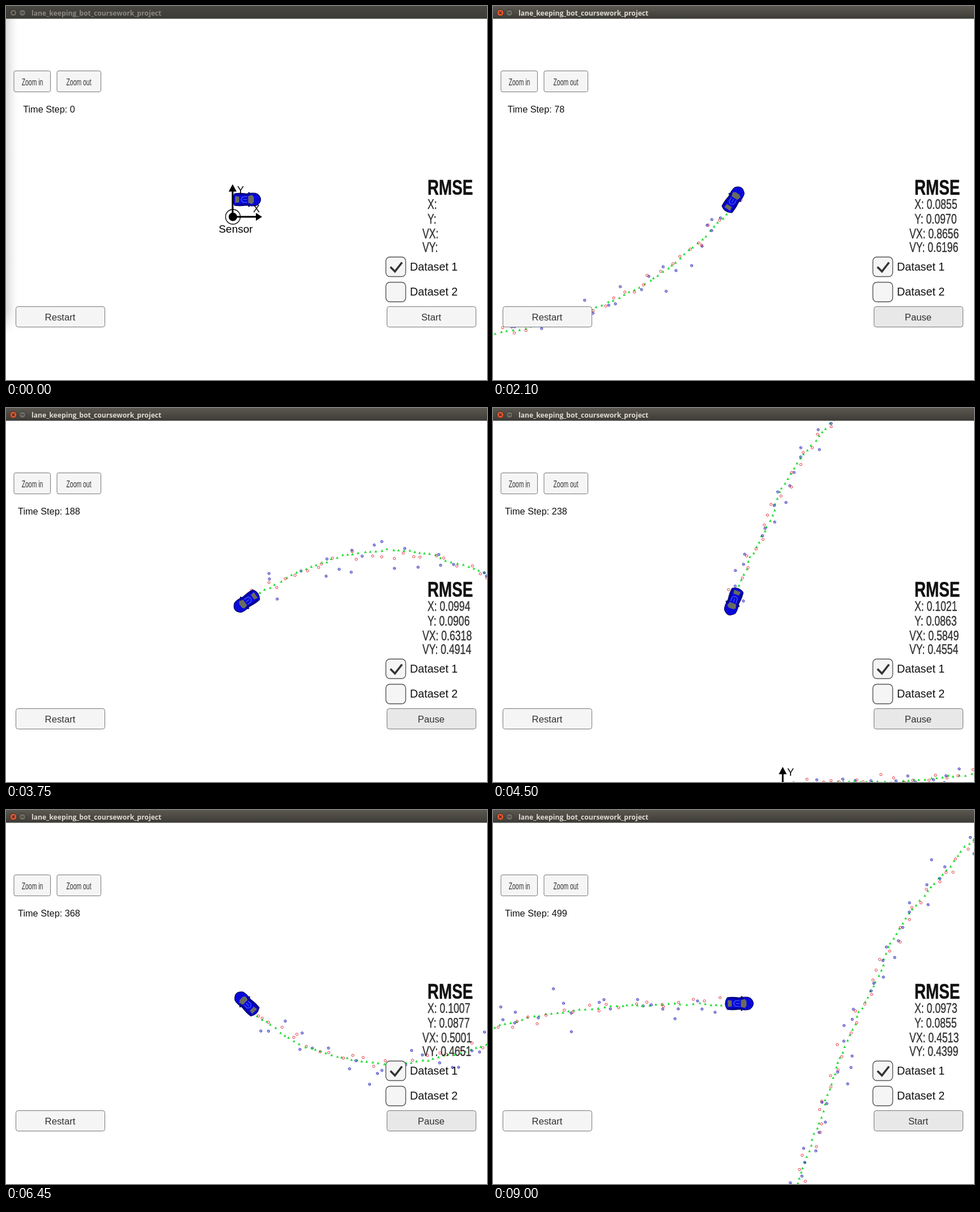
These frames come from a looping animation (849 px wide and 660 px high, 9150 ms). An HTML page with a canvas:

```html
<!DOCTYPE html>
<html lang="en">
<head>
<meta charset="utf-8">
<title>Tracking simulator</title>
<style>
  html, body { margin: 0; width: 849px; height: 660px; overflow: hidden; background: #fff; }
  canvas, svg { position: absolute; left: 0; top: 0; width: 849px; height: 660px; }
  text { font-family: "Liberation Sans", Arial, sans-serif; }
  .box { fill: #f5f5f5; stroke: #777; stroke-width: 1; }
  .check { stroke: #555; stroke-width: 1.4; }
  .label { fill: #323232; font-size: 16.7px; text-anchor: middle; }
  .small { fill: #323232; font-size: 15.6px; text-anchor: middle; }
  .data { fill: #111; font-size: 19.7px; }
  .value { fill: #323232; stroke: #323232; stroke-width: .4; font-size: 23.5px; }
  .caption { font: 700 12.2px "Open Sans", "Noto Sans", sans-serif; }
</style>
</head>
<body>
<canvas id="view" width="849" height="660"></canvas>
<svg viewBox="0 0 849 660">
  <defs>
    <linearGradient id="shade">
      <stop offset="0" stop-color="#dcdcdc"/>
      <stop offset=".4" stop-color="#f1f1f1"/>
      <stop offset="1" stop-color="#fff" stop-opacity="0"/>
    </linearGradient>
    <linearGradient id="fade" x2="0" y2="1">
      <stop offset=".93" stop-color="#fff"/>
      <stop offset="1" stop-color="#000"/>
    </linearGradient>
    <mask id="soft"><rect y="22" width="26" height="556" fill="url(#fade)"/></mask>
    <linearGradient id="bar" x2="0" y2="1">
      <stop offset="0" stop-color="#5b5850"/>
      <stop offset="1" stop-color="#3d3b36"/>
    </linearGradient>
    <linearGradient id="dimBar" x2="0" y2="1">
      <stop offset="0" stop-color="#484640"/>
      <stop offset="1" stop-color="#3c3b37"/>
    </linearGradient>
  </defs>

  <rect id="shadow" y="22" width="26" height="556" fill="url(#shade)" mask="url(#soft)"/>

  <rect id="title" width="849" height="22.5"/>
  <circle id="close" cx="13" cy="12" r="6" stroke="#302e2a"/>
  <path d="M10.8 9.8l4.4 4.4m0-4.4l-4.4 4.4" stroke="#3b2a24" stroke-width="1.4"/>
  <circle cx="29" cy="12" r="6" fill="#6b6961" stroke="#302e2a"/>
  <path d="M26 12h6" stroke="#3b3a36" stroke-width="1.4"/>
  <text id="caption" class="caption" x="45" y="16.5">lane_keeping_bot_coursework_project</text>

  <rect class="box" x="14" y="114.5" width="64.5" height="37" rx="3"/>
  <rect class="box" x="90" y="114.5" width="77.5" height="37" rx="3"/>
  <text class="small" transform="translate(46.5 139.5) scale(.67 1)">Zoom in</text>
  <text class="small" transform="translate(128.5 139.5) scale(.67 1)">Zoom out</text>
  <text id="step" x="76" y="188" font-size="16.3" text-anchor="middle" fill="#111"></text>

  <rect class="box" x="17.5" y="530.5" width="157" height="36" rx="4"/>
  <text class="label" x="95.5" y="554.5">Restart</text>
  <rect id="button" class="box" x="672.5" y="530.5" width="157" height="36" rx="4"/>
  <text id="action" class="label" x="750.5" y="554.5"></text>

  <text transform="translate(744 333) scale(.74 1)" font-size="37.5" font-weight="700" fill="#111" stroke="#111" stroke-width=".5">RMSE</text>
  <g id="errors"></g>

  <rect class="box check" x="670.5" y="443" width="35" height="34.5" rx="7"/>
  <rect class="box check" x="670.5" y="487.5" width="35" height="34.5" rx="7"/>
  <path d="M678.5 460.5l8 8 12.5-16" fill="none" stroke="#333" stroke-width="3.6"/>
  <text class="data" x="713" y="467">Dataset 1</text>
  <text class="data" x="713" y="511">Dataset 2</text>
</svg>

<script>
const LOOP = 9150, TICK = 150, SCALE = 40, DT = 0.05, LAST = 499;
const CENTER = { x: 424, y: 342 };
const $ = id => document.getElementById(id);
const ctx = $("view").getContext("2d");

// Seeded gaussian noise
let seed = 20417;
function random() {
  seed = (seed * 1664525 + 1013904223) % 4294967296;
  return seed / 4294967296;
}
const gauss = () => Math.sqrt(-2 * Math.log(1 - random())) * Math.cos(2 * Math.PI * random());

// The car drives with a sinusoidal turn rate and a gently varying speed.
const path = [];
for (let k = 0, x = 0.6, y = 0.6, yaw = 0; k <= LAST; k++) {
  const phase = 2 * Math.PI * (k + 1) / 500;
  const rate = 0.55 * Math.sin(phase), turn = rate * DT;
  const move = (5 + 0.2 * Math.cos(2 * phase)) * DT;
  path.push({ x, y, yaw, rate });
  x += move * Math.cos(yaw + turn / 2);
  y += move * Math.sin(yaw + turn / 2);
  yaw += turn;
}

// Lidar and radar take turns; the estimate drifts and runs a little wide in bends.
let driftX = 0, driftY = 0;
const trail = path.map((p, k) => {
  driftX = 0.7 * driftX + 0.03 * gauss();
  driftY = 0.7 * driftY + 0.03 * gauss();
  const wide = 0.15 * p.rate;
  const radar = k % 2 === 1;
  let mx = p.x + 0.13 * gauss(), my = p.y + 0.13 * gauss();
  if (radar) {
    const range = Math.hypot(p.x, p.y) + 0.2 * gauss();
    const angle = Math.atan2(p.y, p.x) + 0.024 * gauss();
    mx = range * Math.cos(angle);
    my = range * Math.sin(angle);
  }
  return {
    x: p.x + driftX + wide * Math.sin(p.yaw),
    y: p.y + driftY - wide * Math.cos(p.yaw),
    mx, my, radar
  };
});

// Step, then the error of X, Y, VX and VY
const errors = [
  [8, 0.07, 0.09, 2.2, 1.3],
  [78, 0.0855, 0.0970, 0.8656, 0.6196],
  [128, 0.0931, 0.0996, 0.7257, 0.5636],
  [238, 0.1021, 0.0863, 0.5849, 0.4554],
  [368, 0.1007, 0.0877, 0.5001, 0.4651],
  [448, 0.0975, 0.0861, 0.4703, 0.4478],
  [499, 0.0973, 0.0855, 0.4513, 0.4399]
];
function errorAt(k, col) {
  let i = 0;
  while (i < errors.length - 2 && errors[i + 1][0] < k) i++;
  const a = errors[i], b = errors[i + 1];
  const sum = row => row[col] ** 2 * row[0];
  const f = (k - a[0]) / (b[0] - a[0]);
  return Math.sqrt((sum(a) + (sum(b) - sum(a)) * f) / k).toFixed(4);
}

const rows = [["X:", 744, 358], ["Y:", 744, 383.5], ["VX:", 735, 410], ["VY:", 735, 434]].map(([name, x, y]) => {
  const el = document.createElementNS("http://www.w3.org/2000/svg", "text");
  el.setAttribute("class", "value");
  el.setAttribute("transform", `translate(${x} ${y}) scale(.75 1)`);
  $("errors").append(el);
  return { name, el };
});

function shape(points, color) {
  ctx.beginPath();
  points.forEach(([x, y]) => ctx.lineTo(x, y));
  ctx.closePath();
  ctx.fillStyle = color;
  ctx.fill();
}

function ring(x, y, r, color, width) {
  ctx.beginPath();
  ctx.arc(x, y, r, 0, 7);
  ctx.strokeStyle = color;
  ctx.lineWidth = width;
  ctx.stroke();
}

function line(x1, y1, x2, y2) {
  ctx.beginPath();
  ctx.moveTo(x1, y1);
  ctx.lineTo(x2, y2);
  ctx.stroke();
}

function drawTrail(k, cam) {
  const sx = x => CENTER.x + (x - cam.x) * SCALE;
  const sy = y => CENTER.y - (y - cam.y) * SCALE;
  for (const p of trail.slice(0, k + 1)) {
    const x = sx(p.x), y = sy(p.y), mx = sx(p.mx), my = sy(p.my);
    shape([[x - 2.4, y + 2], [x, y - 2.4], [x + 2.4, y + 2]], "#22dd33");
    ring(mx, my, 2.1, p.radar ? "#1414b4" : "#e0202c", 0.9);
    if (p.radar) line(mx - 1.3, my - 0.8, mx + 1.3, my + 0.8);
  }
}

function drawSensor(cam) {
  ctx.save();
  ctx.translate(CENTER.x - cam.x * SCALE, CENTER.y + cam.y * SCALE + 5.5);
  ring(0.5, 0.5, 13, "#000", 1.3);
  ctx.lineWidth = 3;
  line(0, 0, 0, -47);
  line(0, 0.5, 44, 0.5);
  shape([[-7, -44], [0, -57], [7, -44]], "#000");
  shape([[41, -6.5], [52, 0.5], [41, 7.5]], "#000");
  ctx.beginPath();
  ctx.arc(0.5, 0.5, 7.5, 0, 7);
  ctx.fill();
  ctx.font = '18px "Liberation Sans", Arial, sans-serif';
  ctx.textAlign = "center";
  ctx.fillText("Y", 14, -41);
  ctx.fillText("X", 42, -7.5);
  ctx.font = '19px "Liberation Sans", Arial, sans-serif';
  ctx.fillText("Sensor", 5.5, 28.5);
  ctx.restore();
}

function drawCar(x, y, yaw) {
  ctx.save();
  ctx.translate(x, y);
  ctx.rotate(-yaw);
  shape([[3, -13], [5, -13], [7, -10], [7, 10], [5, 13], [3, 13], [4, 0]], "#080870");
  ctx.beginPath();
  ctx.moveTo(-21, -10.5);
  ctx.quadraticCurveTo(-12, -12, 0, -10.2);
  ctx.quadraticCurveTo(13, -12.5, 19, -10);
  ctx.quadraticCurveTo(31, 0, 19, 10);
  ctx.quadraticCurveTo(13, 12.5, 0, 10.2);
  ctx.quadraticCurveTo(-12, 12, -21, 10.5);
  ctx.quadraticCurveTo(-28, 0, -21, -10.5);
  ctx.fillStyle = "#0808dc";
  ctx.fill();
  ctx.strokeStyle = "#06065c";
  ctx.lineWidth = 1.2;
  ctx.stroke();
  line(-19, -8.5, 8, -8.5);
  line(-19, 8.5, 8, 8.5);
  shape([[3, -6], [10, -8], [13, -4], [13, 4], [10, 8], [3, 6]], "#696b60");
  shape([[-20, -6], [-13, -5], [-13, 5], [-20, 6]], "#696b60");
  ctx.strokeStyle = "#4b62e8";
  ctx.beginPath();
  ctx.moveTo(1, -5);
  ctx.lineTo(-6, -5);
  ctx.quadraticCurveTo(-13, 0, -6, 5);
  ctx.lineTo(1, 5);
  ctx.moveTo(1, 0);
  ctx.lineTo(-6, 0);
  ctx.stroke();
  ctx.restore();
}

function render(n) {
  const k = Math.max(0, Math.min(LAST, 10 * n - 62));
  const done = k === LAST, focused = n >= 5, running = n >= 6 && !done;
  const cam = path[k];

  ctx.clearRect(0, 0, 849, 660);
  if (k) drawTrail(k, cam);
  // The car rolls one step out of the centre once the drive has ended.
  drawCar(CENTER.x + (done ? 10.5 : 0.5), CENTER.y - 0.5, cam.yaw);
  drawSensor(cam);

  $("shadow").style.display = focused ? "none" : "";
  $("title").setAttribute("fill", focused ? "url(#bar)" : "url(#dimBar)");
  $("close").setAttribute("fill", focused ? "#e2562f" : "#6b6961");
  $("caption").setAttribute("fill", focused ? "#dfdbd2" : "#8b887f");
  $("step").textContent = "Time Step: " + k;
  $("action").textContent = running ? "Pause" : "Start";
  $("button").style.fill = n >= 6 ? "#e8e8e8" : "#f5f5f5";
  rows.forEach(({ name, el }, i) => {
    el.textContent = k ? `${name} ${errorAt(k, i + 1)}` : name;
  });
}

const start = performance.now();
let shown = -1;
function loop() {
  const n = Math.floor((performance.now() - start) % LOOP / TICK);
  if (n !== shown) render(shown = n);
  requestAnimationFrame(loop);
}
loop();
</script>
</body>
</html>
```
